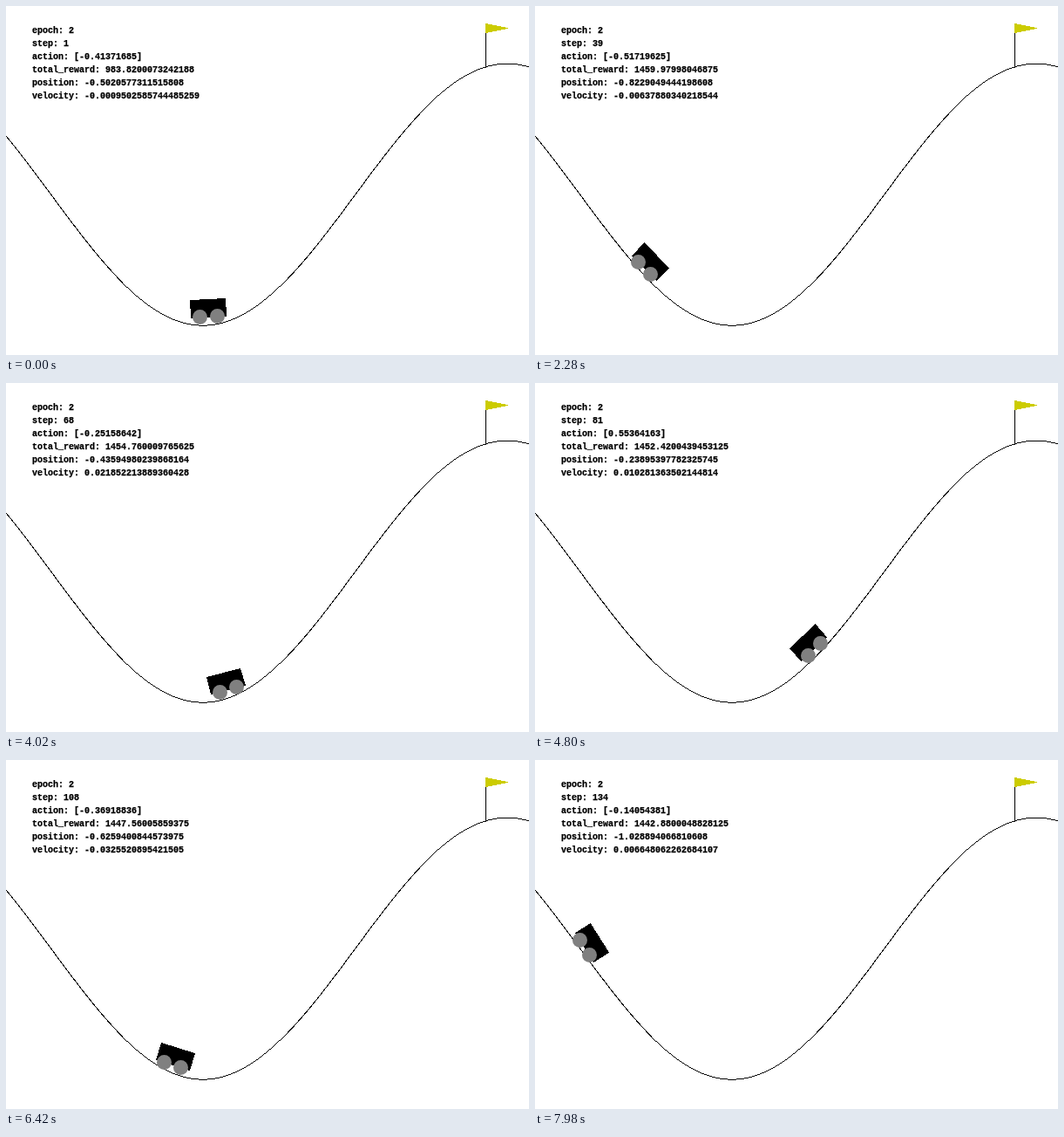
These frames come from a looping animation (600 px wide and 400 px high, 8 s). An HTML page with a canvas:

```html
<!DOCTYPE html>
<html lang="en">
<head>
<meta charset="utf-8">
<title>Mountain car</title>
<style>
  html, body { margin: 0; width: 100%; height: 100%; overflow: hidden; background: #fff; }
  canvas { position: absolute; left: 0; top: 0; }
  pre {
    position: absolute; left: 30px; top: 21px; margin: 0; color: #000;
    font: bold 10px/15px "Liberation Mono", monospace;
    -webkit-text-stroke: 0.25px #000;
  }
</style>
</head>
<body>
<canvas id="stage" width="600" height="400"></canvas>
<pre id="readout"></pre>
<script>
const STEP_MS = 60, LOOP_MS = 8000, LAST = 134;
const SCALE = 600 / 1.8, MIN_X = -1.2, POWER = 0.0015, GRAVITY = 0.0025;

const pull = pos => -GRAVITY * Math.cos(3 * pos);
const height = pos => (Math.sin(3 * pos) * 0.45 + 0.55) * SCALE;

// Key points of the ride: step, position, velocity.
// A velocity belongs to the half step before, so half a pull brings it up to date.
const keys = [
  [1, -0.5020577311, -0.0009502585744],
  [17, -0.5954111814, -0.009559812024],
  [29, -0.725, -0.0132],
  [39, -0.8229049444, -0.006378803402],
  [55, -0.7299996614, 0.01726292819],
  [71, -0.377, 0.018],
  [81, -0.2389539778, 0.0102813635],
  [88, -0.1955, 0.001],
  [99, -0.349, -0.0266],
  [108, -0.6259400845, -0.03255208954],
  [134, -1.0288940668, 0.006648062263]
].map(([step, pos, vel]) => ({ step, pos, slope: vel + pull(pos) / 2 }));

// Cubic Hermite path through the key points.
function motion(step) {
  let i = 0;
  while (i < keys.length - 2 && step >= keys[i + 1].step) i++;
  const a = keys[i], b = keys[i + 1], size = b.step - a.step;
  const u = (step - a.step) / size, w = 1 - u;
  const pos = w * w * ((1 + 2 * u) * a.pos + u * size * a.slope)
            + u * u * ((3 - 2 * u) * b.pos - w * size * b.slope);
  const slope = 6 * u * w * (b.pos - a.pos) / size
              + w * (1 - 3 * u) * a.slope + u * (3 * u - 2) * b.slope;
  return { pos, vel: slope - pull(pos) / 2 };
}

function stateAt(step) {
  const now = motion(step), before = motion(step - 1);
  const push = (now.vel - before.vel - pull(before.pos)) / POWER;
  return {
    step, ...now,
    action: Math.max(-1, Math.min(1, push)),
    reward: 1467 - 0.18 * step - 483 * Math.exp((1 - step) / 2)
  };
}

const ctx = document.getElementById("stage").getContext("2d");
const readout = document.getElementById("readout");

// World coordinates point up, the stage's pixel rows down.
const toPixel = ([x, y]) => [Math.trunc(x), 399 - Math.trunc(y)];

// A hard line, one pixel per column or row.
function line([x0, y0], [x1, y1]) {
  const dx = x1 - x0, dy = y1 - y0;
  const count = Math.ceil(Math.max(Math.abs(dx), Math.abs(dy)));
  for (let i = 0; i <= count; i++) {
    ctx.fillRect(Math.round(x0 + dx * i / count), Math.round(y0 + dy * i / count), 1, 1);
  }
}

function polygon(points, color) {
  const corners = points.map(toPixel);
  ctx.fillStyle = color;
  ctx.beginPath();
  corners.forEach(([x, y]) => ctx.lineTo(x + 0.5, y + 0.5));
  ctx.fill();
  corners.forEach((corner, i) => line(corner, corners[(i + 1) % corners.length]));
}

function drawHill() {
  ctx.fillStyle = "#000";
  const steep = x => Math.abs(1.35 * Math.cos(3 * (x / SCALE + MIN_X))) > 1;
  const top = x => 399 - height(x / SCALE + MIN_X);
  for (let x = 0; x < 600; x++) {
    if (steep(x)) line([x, top(x)], [x + 1, top(x + 1)]);
    else ctx.fillRect(x, Math.round(top(x)), 1, 1);
  }
}

function drawCar(pos) {
  const angle = Math.cos(3 * pos), c = Math.cos(angle), s = Math.sin(angle);
  const cx = (pos - MIN_X) * SCALE, cy = height(pos) + 10;
  const place = (x, y) => [cx + x * c - y * s, cy + x * s + y * c];
  polygon([place(-20, 0), place(-20, 20), place(20, 20), place(20, 0)], "#000");
  ctx.fillStyle = "#808080";
  for (const side of [10, -10]) {
    const [x, y] = toPixel(place(side, 0));
    ctx.beginPath();
    ctx.arc(x + 0.5, y + 0.5, 8.5, 0, 2 * Math.PI);
    ctx.fill();
  }
}

function drawFlag() {
  ctx.fillStyle = "#000";
  ctx.fillRect(550, 20, 1, 51);
  polygon([[550, 379], [550, 369], [575, 374]], "#cccc00");
}

function show(state) {
  ctx.clearRect(0, 0, 600, 400);
  drawHill();
  drawCar(state.pos);
  drawFlag();
  readout.textContent = [
    "epoch: 2",
    `step: ${state.step}`,
    `action: [${Number(state.action.toPrecision(8))}]`,
    `total_reward: ${Math.fround(state.reward)}`,
    `position: ${Math.fround(state.pos)}`,
    `velocity: ${Math.fround(state.vel)}`
  ].join("\n");
}

const start = performance.now();
let shown = 0;
function tick() {
  const time = (performance.now() - start) % LOOP_MS;
  const step = Math.min(LAST, 1 + Math.floor(time / STEP_MS));
  if (step !== shown) show(stateAt(shown = step));
  requestAnimationFrame(tick);
}
tick();
</script>
</body>
</html>
```
